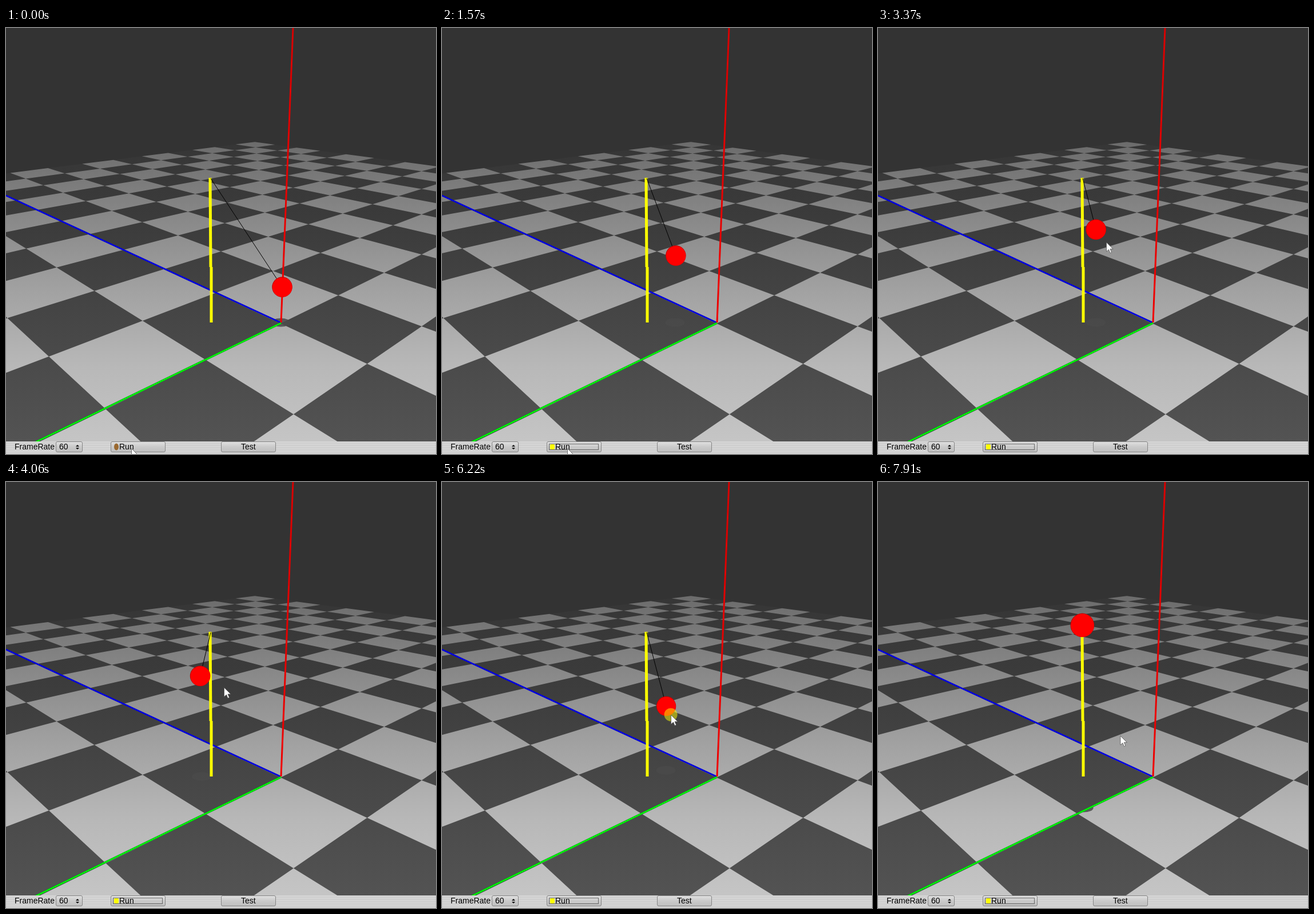
These frames come from a looping animation (752x745 px, 7.99 s). An HTML page with a canvas:

```html
<!DOCTYPE html>
<html lang="en">
<head>
<meta charset="utf-8">
<title>Spring pendulum</title>
<style>
  html, body { margin: 0; width: 752px; height: 745px; overflow: hidden; background: #333; }
  canvas { display: block; }
</style>
</head>
<body>
<canvas id="stage" width="752" height="745"></canvas>
<script>
const W = 752, H = 745, FLOOR_END = 723, LOOP = 7990;
const RUN_AT = 280, SWING_AT = 440, SETTLED_AT = 5150;
const GRAB_AT = 5880, DROP_AT = 6400, PEAK_AT = 6910;
const REST = { x: 358, y: 350 };
const stage = document.getElementById('stage').getContext('2d');
const backdrop = document.createElement('canvas');
backdrop.width = W;
backdrop.height = H;

// Mouse path: time, x, y
const cursorPath = [
  [0, 219, 735], [2800, 219, 735], [3200, 409, 383], [3680, 381, 359], [4680, 381, 359],
  [4850, 373, 346], [GRAB_AT, 366, 365], [DROP_AT, 418, 429], [7060, 428, 437], [LOOP, 423, 444]
];

const mix = (a, b, u) => a + (b - a) * u;
const easeInOut = u => (1 - Math.cos(Math.PI * u)) / 2;
const wave = turns => Math.cos(2 * Math.PI * turns);

function cursorAt(t) {
  const i = Math.max(1, cursorPath.findIndex(p => p[0] >= t));
  const [t0, x0, y0] = cursorPath[i - 1], [t1, x1, y1] = cursorPath[i];
  const u = (t - t0) / (t1 - t0);
  return { x: mix(x0, x1, u), y: mix(y0, y1, u) };
}

// Damped swing; the sideways motion is quicker while the spring is far stretched
function swing(t) {
  const s = Math.min(Math.max(t, SWING_AT), SETTLED_AT) - SWING_AT;
  const turns = s / 1500 + 0.14 * (1 - Math.exp(-s / 500));
  return {
    x: REST.x + 125 * Math.exp(-s / 1950) * wave(turns),
    y: REST.y + 103 * Math.exp(-s / 1700) * wave(s / 1058),
    floorY: 515
  };
}

function drag(t) {
  const cursor = cursorAt(t);
  return { x: cursor.x - 8, y: cursor.y - 15, floorY: mix(514, 499, (t - GRAB_AT) / (DROP_AT - GRAB_AT)) };
}

function rebound(t) {
  const s = t - PEAK_AT, fade = Math.exp(-s / 1300);
  return {
    x: REST.x - 90 * fade * wave(s / 1330),
    y: REST.y - 228 * fade * wave(s / 1058),
    floorY: 530 - 40 * wave((s - 150) / 1700)
  };
}

function fling(t) {
  const from = drag(DROP_AT), to = rebound(PEAK_AT);
  const u = easeInOut((t - DROP_AT) / (PEAK_AT - DROP_AT));
  return { x: mix(from.x, to.x, u), y: mix(from.y, to.y, u), floorY: mix(from.floorY, to.floorY, u) };
}

function ballAt(t) {
  if (t < GRAB_AT) return swing(t);
  if (t < DROP_AT) return drag(t);
  return t < PEAK_AT ? fling(t) : rebound(t);
}

function line(c, points, color, width) {
  c.beginPath();
  points.forEach(p => c.lineTo(...p));
  c.strokeStyle = color;
  c.lineWidth = width;
  c.stroke();
}

function disc(c, x, y, rx, ry, color) {
  c.beginPath();
  c.ellipse(x, y, rx, ry, 0, 0, 2 * Math.PI);
  c.fillStyle = color;
  c.fill();
}

function vertical(c, top, bottom, colors) {
  const g = c.createLinearGradient(0, top, 0, bottom);
  colors.forEach((color, i) => g.addColorStop(i / (colors.length - 1), color));
  return g;
}

// Perspective of floor cell corners; a runs along green, b along blue
const depth = (a, b) => 1 - 0.128 * a + 0.1386 * b;
const project = (a, b) => [
  (480.3 - 175.2 * a - 63.7 * b) / depth(a, b),
  (516.8 - 10.4 * a + 11 * b) / depth(a, b)
];

function drawBackdrop(c) {
  c.fillStyle = '#333';
  c.fillRect(0, 0, W, H);
  const shades = [
    vertical(c, 200, 723, ['#363636', '#3b3b3b', '#434343', '#4b4b4b', '#535353']),
    vertical(c, 200, 723, ['#6c6c6c', '#888', '#a2a2a2', '#b8b8b8', '#c5c5c5'])
  ];
  shades.forEach((shade, parity) => {
    c.beginPath();
    for (let a = -10; a < 10; a++) {
      for (let b = -10; b < 10; b++) {
        if (Math.abs(a + b) % 2 !== parity || depth(a + 1, b) < 0.1) continue;
        c.moveTo(...project(a, b));
        c.lineTo(...project(a + 1, b));
        c.lineTo(...project(a + 1, b + 1));
        c.lineTo(...project(a, b + 1));
        c.closePath();
      }
    }
    c.fillStyle = shade;
    c.fill();
  });
}

function drawAxes(c) {
  line(c, [[0, 293], [480, 515]], '#0000dc', 2.6);
  line(c, [[481, 516], [52, 724]], '#063', 3.4);
  line(c, [[481, 516], [52, 724]], '#00f000', 2.6);
  line(c, [[481, 515], [502, 0]], vertical(c, 0, 515, ['#d80000', '#f00000']), 3);
}

function drawPole(c) {
  line(c, [[357, 262], [358, 418]], '#ff0', 5);
  line(c, [[359, 418], [359, 515]], '#ff0', 5);
}

function drawBall(c, { x, y, floorY }) {
  const radius = 17.8 + (floorY - 515) * 0.055;
  disc(c, x, y, radius, radius, '#c80000');
  disc(c, x + 0.3, y + 0.4, radius - 0.8, radius - 0.8, '#f00');
}

function drawShadow(c, { x, y, floorY }) {
  const lean = 1 + 0.0004 * (floorY - y);
  disc(c, 378 + (x - 378) / lean, floorY, 17, 7.5, 'rgba(74,74,74,.85)');
}

function drawButton(c, x, width) {
  c.beginPath();
  c.roundRect(x + 0.5, 723.5, width, 18, 2.5);
  c.fillStyle = vertical(c, 723, 742, ['#e2e2e2', '#cacaca', '#bebebe']);
  c.fill();
  c.strokeStyle = '#858585';
  c.lineWidth = 1;
  c.stroke();
}

function label(c, text, x) {
  c.font = '14px "Liberation Sans", Arial, sans-serif';
  c.fillStyle = '#000';
  c.fillText(text, x, 737);
}

function drawToolbar(c, running) {
  c.fillStyle = '#d6d6d6';
  c.fillRect(0, FLOOR_END, W, H - FLOOR_END);
  c.fillStyle = '#cecece';
  for (let y = FLOOR_END + 2; y < H; y += 4) c.fillRect(0, y, W, 2);
  drawButton(c, 87, 46);
  drawButton(c, 183, 95);
  drawButton(c, 376, 95);
  if (running) {
    c.fillStyle = '#ff0';
    c.beginPath();
    c.roundRect(189, 728, 8, 9, 2);
    c.fill();
    c.setLineDash([1, 1]);
    c.strokeStyle = '#000';
    c.strokeRect(187.5, 727.5, 86, 10);
    c.setLineDash([]);
  } else {
    disc(c, 193, 732.5, 4, 6, '#9a6930');
  }
  label(c, 'FrameRate', 15);
  label(c, '60', 93);
  label(c, 'Run', 198);
  label(c, 'Test', 411);
  for (const side of [-1, 1]) {
    c.beginPath();
    c.moveTo(122, 733 + side);
    c.lineTo(128, 733 + side);
    c.lineTo(125, 733 + side * 4);
    c.fill();
  }
}

function drawCursor(c, { x, y }) {
  const arrow = new Path2D('M0 0V16L4 12.5L6.5 18.5L9 17.5L6.5 11.5H11.5Z');
  c.save();
  c.translate(x + 0.5, y + 0.5);
  c.fillStyle = '#fff';
  c.fill(arrow);
  c.strokeStyle = '#555';
  c.lineWidth = 0.8;
  c.stroke(arrow);
  c.restore();
}

function draw(t) {
  const c = stage, ball = ballAt(t), cursor = cursorAt(t);
  c.drawImage(backdrop, 0, 0);
  drawShadow(c, ball);
  drawAxes(c);
  drawPole(c);
  line(c, [[358, 263], [ball.x, ball.y]], '#000', 1);
  drawBall(c, ball);
  drawToolbar(c, t >= RUN_AT);
  if (t >= GRAB_AT && t < DROP_AT) disc(c, cursor.x, cursor.y, 11.5, 11.5, 'rgba(255,255,0,.5)');
  drawCursor(c, cursor);
}

drawBackdrop(backdrop.getContext('2d'));
const start = performance.now();
function tick() {
  draw((performance.now() - start) % LOOP);
  requestAnimationFrame(tick);
}
tick();
</script>
</body>
</html>
```
